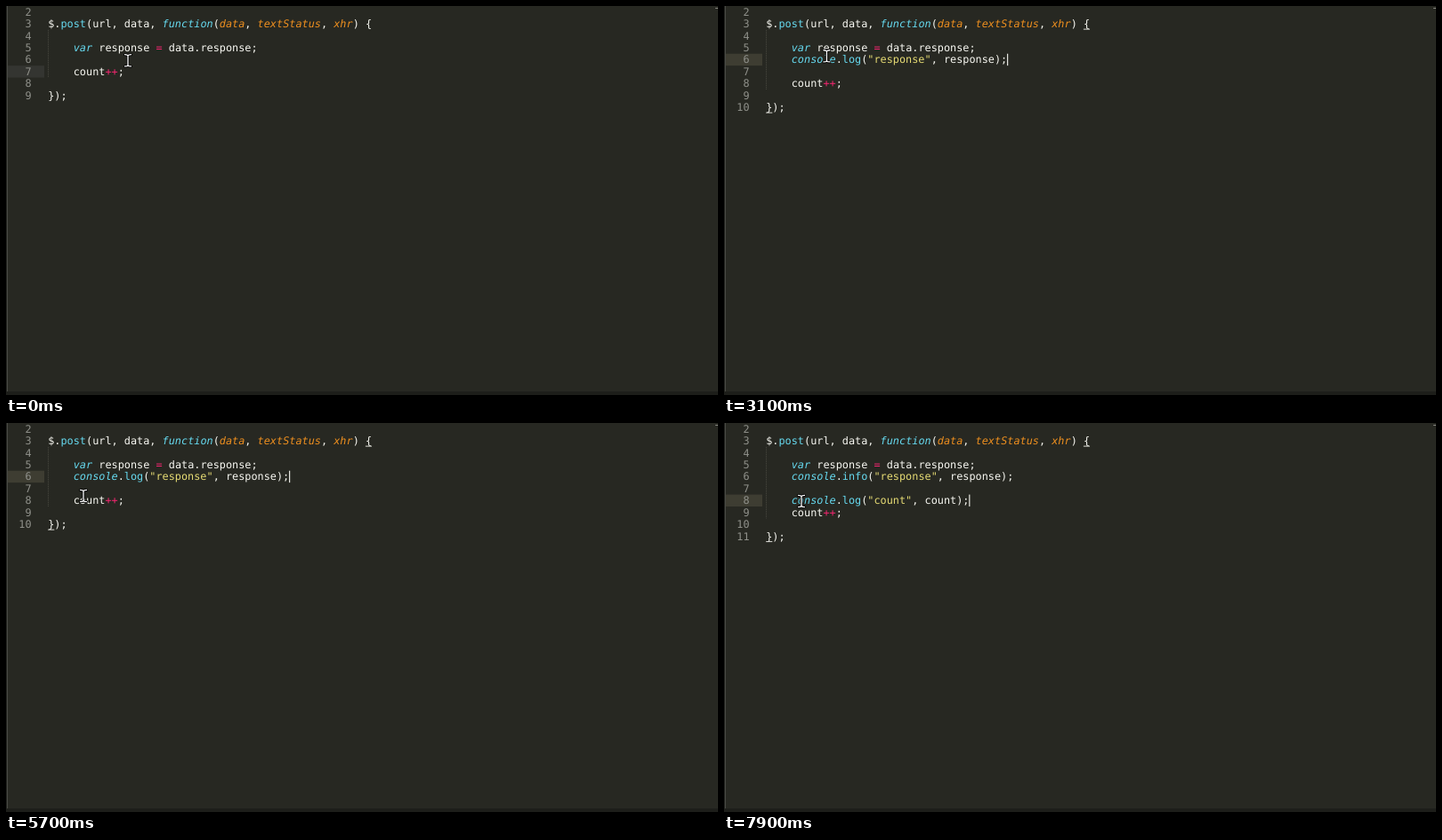
Write an HTML page that moves like this. It is 800x438 px and loops after 8000 ms.

```html
<!DOCTYPE html>
<html lang="en">
<head>
<meta charset="utf-8">
<title>Console logging in an editor</title>
<style>
html, body { margin: 0; width: 100%; height: 100%; overflow: hidden; background: #272822; }
svg { display: block; width: 800px; height: 438px; }
text { font: 11.85px "DejaVu Sans Mono", monospace; fill: #f8f8f2; white-space: pre; text-rendering: geometricPrecision; }
.num { fill: #8f908a; text-anchor: end; }
.fn { fill: #66d9ef; }
.key { fill: #66d9ef; font-style: italic; }
.arg { fill: #fd971f; font-style: italic; opacity: .93; }
.op { fill: #f92672; }
.str { fill: #e6db74; }
</style>
</head>
<body>
<svg viewBox="0 0 800 438">
  <rect width="800" height="438" fill="#272822"/>
  <rect width="1" height="438" fill="#1d1e1a"/>
  <rect x="1" width="1" height="438" fill="#4a4b46"/>
  <rect y="434" width="800" height="4" fill="#1d1e1a"/>
  <rect x="797" y="2" width="3" height="1" fill="#85857f"/>
  <g id="page"></g>
  <rect id="caret" width="1.1" height="13.4" fill="#f8f8f2"/>
  <g id="mouse" fill="none" stroke-linecap="round">
    <path id="edge" stroke="#000" stroke-width="3"/>
    <path id="core" stroke="#fff" stroke-width="1.3"/>
  </g>
</svg>
<script>
const LOOP = 8000, LEFT = 47.2, CW = 7.134, LH = 13.43;
const $ = id => document.getElementById(id);
const colX = c => LEFT + c * CW;
const lineY = n => (n - 2) * LH;

const beam = "M-3.5-6.6Q-.6-6.6 0-5.4Q.6-6.6 3.5-6.6M0-5.4V5.4M-3.5 6.6Q-.6 6.6 0 5.4Q.6 6.6 3.5 6.6";
$("edge").setAttribute("d", beam);
$("core").setAttribute("d", beam);

// A line of code is a list of [text, class] parts.
const head = [["$."], ["post", "fn"], ["(url, data, "], ["function", "key"], ["("], ["data", "arg"], [", "],
  ["textStatus", "arg"], [", "], ["xhr", "arg"], [") {"]];
const decl = [["    "], ["var", "key"], [" response "], ["=", "op"], [" data.response;"]];
const count = [["    count"], ["++", "op"], [";"]];
const log = (kind, name) => [["    "], ["console", "key"], ["."], [kind, "fn"], ["("],
  [`"${name}"`, "str"], [`, ${name});`]];
const width = parts => parts.reduce((n, p) => n + p[0].length, 0);

// Editor states: first: log kind for response; second: log kind for count.
const states = [
  { at: 0, line: 7, idle: true },
  { at: 1500, line: 5, col: 13 },
  { at: 1600, line: 5, col: 16, sel: [8, 16], twin: [24, 32] },
  { at: 2600, line: 6, first: "log" },
  { at: 4300, line: 6, first: "info" },
  { at: 4600, line: 6, first: "warn" },
  { at: 4800, line: 6, first: "error" },
  { at: 5200, line: 6, first: "log" },
  { at: 6800, line: 6, first: "info" },
  { at: 7000, line: 8, col: 6, first: "info" },
  { at: 7100, line: 8, col: 9, first: "info", sel: [4, 9] },
  { at: 7500, line: 8, first: "info", second: "log" }
];

// Pointer stops: time, x, y
const stops = [
  [0, 137, 61.3], [1000, 137, 61.3], [1300, 137, 47.5], [2800, 137, 47.5], [3100, 115.5, 56.3],
  [3600, 87, 82], [5800, 87, 82], [6200, 87, 88], [LOOP, 87, 88]
];

function codeOf(s) {
  const code = [[], head, [], decl];
  if (s.first) code.push(log(s.first, "response"));
  code.push([]);
  if (s.second) code.push(log(s.second, "count"));
  code.push(count, [], [["});"]]);
  return code;
}

const rect = (x, y, w, h, rest) => `<rect x="${x}" y="${y}" width="${w}" height="${h}" ${rest}/>`;
const label = (x, n, cls, str) =>
  `<text x="${x.toFixed(2)}" y="${(lineY(n) + 10.7).toFixed(2)}" class="${cls}">${str}</text>`;
const span = ([a, b], n, rest) =>
  rect(colX(a) + .2, lineY(n) + .3, (b - a) * CW, LH - .6, `rx="2" ${rest}`);

function render(s) {
  const code = codeOf(s), last = code.length + 1;
  let out = rect(2, lineY(s.line), 41, LH, `fill="${s.idle ? "#343531" : "#3e3d32"}"`);
  out += `<path d="M47.5 ${lineY(4)}V${lineY(last - 1)}" stroke="#4a4a42" stroke-dasharray="1 1"/>`;
  if (s.sel) out += span(s.sel, s.line, 'fill="#575751"');
  code.forEach((parts, i) => {
    let col = 0;
    out += label(28.6, i + 2, "num", i + 2);
    for (const [str, cls = ""] of parts) {
      const lead = str.length - str.trimStart().length;
      if (str.trim()) out += label(colX(col + lead), i + 2, cls, str.trim());
      col += str.length;
    }
  });
  if (s.twin) out += span(s.twin, s.line, 'fill="none" stroke="#deded8"');
  if (!s.idle && !s.sel) {
    for (const [c, n] of [[50, 3], [0, last]])
      out += rect(colX(c), lineY(n) + 12.2, CW, 1, 'fill="#d8d8d2"');
  }
  $("page").innerHTML = out;
  const col = s.col ?? width(code[s.line - 2]);
  $("caret").setAttribute("x", colX(col) - .2);
  $("caret").setAttribute("y", lineY(s.line));
}

// On, fade out, short pause, fade in.
function blink(ms) {
  const p = ms % 1000 / 1000;
  if (p < .52) return 1;
  if (p < .7) return (.7 - p) / .18;
  return p < .82 ? 0 : (p - .82) / .18;
}

function pointer(t) {
  const i = stops.findIndex(p => p[0] > t);
  const [t0, x0, y0] = stops[i - 1], [t1, x1, y1] = stops[i];
  const k = (t - t0) / (t1 - t0);
  return [x0 + (x1 - x0) * k, y0 + (y1 - y0) * k];
}

let shown;
function draw(t) {
  const s = states.filter(e => e.at <= t).pop();
  if (s !== shown) render(shown = s);
  $("caret").setAttribute("opacity", s.idle ? 0 : blink(t - s.at));
  $("mouse").setAttribute("transform", `translate(${pointer(t)})`);
}

const start = performance.now();
function tick() {
  draw((performance.now() - start) % LOOP);
  requestAnimationFrame(tick);
}
tick();
</script>
</body>
</html>
```
